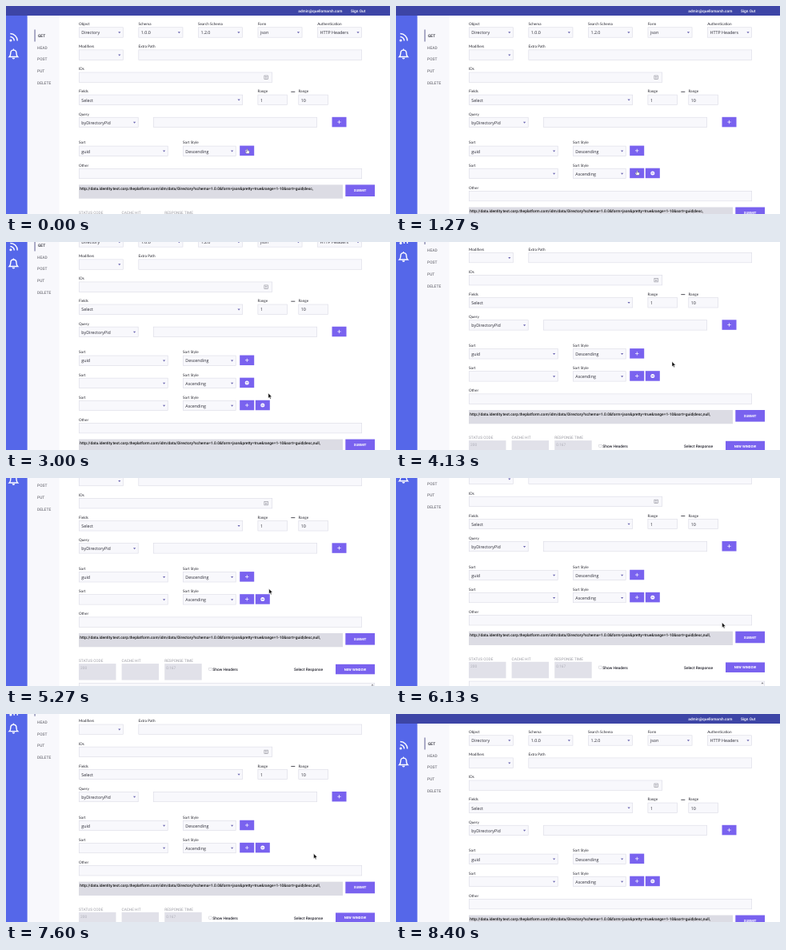
An HTML page with a canvas that plays this animation: 480x260 px, repeating every 8470 ms.

```html
<!DOCTYPE html>
<html lang="en">
<head>
<meta charset="utf-8">
<title>Query builder</title>
<style>
html, body { margin: 0; width: 480px; height: 260px; overflow: hidden; background: #fff; }
canvas { display: block; width: 480px; height: 260px; }
</style>
</head>
<body>
<canvas id="stage"></canvas>
<script>
const W = 480, H = 260, LOOP = 8470;
const LEFT = 91, COL = 74.55, ROW = 28.1, BOX = 13, WIDE = 445;
const canvas = document.getElementById('stage');
const ctx = canvas.getContext('2d');
const dpr = window.devicePixelRatio || 1;
canvas.width = W * dpr;
canvas.height = H * dpr;
ctx.textRendering = 'geometricPrecision';

const FORM = '"Open Sans", "Noto Sans", sans-serif';
const LABEL = 'Lato, "Open Sans", sans-serif';
const UI = 'Roboto, "Liberation Sans", sans-serif';
const PURPLE = '#7962ef', INK = '#262630', GREY = '#77777f', EDGE = '#dcdce6';
const URL_TEXT = 'http://data.identity.test.corp.theplatform.com/idm/data/Directory' +
  '?schema=1.0.0&form=json&pretty=true&range=1-10&sort=guid|desc,';

const ADD_SECOND = 470, ADD_THIRD = 1470, DROP_THIRD = 3400;

// Pointer moves: start, end, tip x, tip y
const MOVES = [
  [900, 1270, 301.5, 205.5],
  [1500, 2200, 330.5, 187.5],
  [2900, 3200, 320.5, 193],
  [3600, 4100, 345, 149.5],
  [4150, 4550, 328.7, 138.5],
  [5870, 6270, 438, 197],
  [6500, 6600, 365, 141.5],
  [7400, 8000, 440, 268],
];

const col = i => LEFT + COL * i;
const row = i => 23 + ROW * i;
const linear = (t, a, b) => Math.min(1, Math.max(0, (t - a) / (b - a)));
const glide = (t, a, b) => {
  const u = linear(t, a, b);
  return u * u * (3 - 2 * u);
};

function scrollAt(t) {
  const down = 38 * linear(t, 2140, 3130) + 3.5 * linear(t, 3200, 4130) +
    16 * linear(t, 5040, 5270) + 2.7 * linear(t, 5270, 6270);
  return down * (1 - glide(t, 7370, 8000));
}

function pointerAt(t) {
  let x = 301.5, y = 178.5;
  for (const [a, b, tx, ty] of MOVES) {
    const u = glide(t, a, b);
    x += (tx - x) * u;
    y += (ty - y) * u;
  }
  return [x, y];
}

function text(str, x, y, size, color = INK, font = UI, weight = 400, align = 'left') {
  ctx.font = `${weight} ${size}px ${font}`;
  ctx.textAlign = align;
  ctx.fillStyle = color;
  ctx.fillText(str, x, y + size * 0.36);
}

function rect(x, y, w, h, color) {
  ctx.fillStyle = color;
  ctx.fillRect(x, y, w, h);
}

function frame(x, y, w, h, color, line = 0.6) {
  ctx.strokeStyle = color;
  ctx.lineWidth = line;
  ctx.strokeRect(x + line / 2, y + line / 2, w - line, h - line);
}

function disc(x, y, r, end = Math.PI * 2) {
  ctx.beginPath();
  ctx.arc(x, y, r, 0, end);
  ctx.fill();
}

function wedge(x, y, size) {
  ctx.beginPath();
  ctx.moveTo(x - 1.6, y - size);
  ctx.lineTo(x + 1.6, y - size);
  ctx.lineTo(x, y + size);
  ctx.fill();
}

// A box with its name above; y is the middle of the name
function field(name, x, y, right, value = '') {
  text(name, x, y, 4.65, INK, LABEL);
  rect(x, y + 4, right - x, BOX, '#f8f8fc');
  frame(x, y + 4, right - x, BOX, EDGE);
  text(value, x + 3.3, y + 10.8, 5.35, INK, FORM);
}

function select(name, x, y, right, value) {
  field(name, x, y, right, value);
  ctx.fillStyle = '#6a64b0';
  wedge(right - 4.9, y + 10.8, 1);
}

function button(x, y, w, h, name) {
  rect(x, y, w, h, PURPLE);
  const cx = x + w / 2, cy = y + h / 2;
  if (name === '+') {
    rect(cx - 2.2, cy - 0.35, 4.4, 0.7, '#fff');
    rect(cx - 0.35, cy - 2.2, 0.7, 4.4, '#fff');
  } else if (name === '-') {
    ctx.fillStyle = '#fff';
    disc(cx, cy, 2.5);
    rect(cx - 1.4, cy - 0.4, 2.8, 0.8, PURPLE);
  } else {
    text(name, cx, cy, 4.25, '#fff', UI, 700, 'center');
  }
}

function icons() {
  ctx.strokeStyle = ctx.fillStyle = '#fff';
  ctx.lineWidth = 1.4;
  for (const r of [5, 9]) {
    ctx.beginPath();
    ctx.arc(5.3, 44, r, -Math.PI / 2, 0);
    ctx.stroke();
  }
  disc(5.9, 43.4, 1.5);
  ctx.stroke(new Path2D('M4.2 64 Q5.8 62.6 5.8 59.5 C5.8 54.3 13 54.3 13 59.5 Q13 62.6 14.6 64 Z'));
  rect(8.8, 54, 1.2, 2, '#fff');
  disc(9.4, 65.2, 1.8, Math.PI);
}

function chrome() {
  rect(0, 0, W, 12.5, '#3d45a6');
  text('admin@quellomarsh.com', 420.5, 6.4, 4.8, '#fff', UI, 500, 'right');
  text('Sign Out', 431, 6.4, 4.8, '#fff', UI, 500);
  icons();
  rect(35.6, 30, 0.9, 15, '#4a4a86');
  ['GET', 'HEAD', 'POST', 'PUT', 'DELETE'].forEach((name, i) =>
    text(name, i ? 39 : 40, 37.6 + i * 14.8, 4.9, i ? GREY : INK, UI, 500));
}

function filters() {
  const top = { Object: 'Directory', Schema: '1.0.0', 'Search Schema': '1.2.0',
    Form: 'json', Authentication: 'HTTP Headers' };
  Object.entries(top).forEach(([name, value], i) =>
    select(name, col(i), row(0), col(i) + 55.7, value));

  select('Modifiers', LEFT, row(1), LEFT + 55.7);
  field('Extra Path', col(1), row(1), WIDE);

  field('IDs', LEFT, row(2), 333);
  frame(322.6, row(2) + 8, 5, 5, '#8a8a94');
  for (const dy of [9.6, 11]) rect(324, row(2) + dy, 2.2, 0.6, '#8a8a94');

  select('Fields', LEFT, row(3), 296, 'Select');
  field('Range', 314.6, row(3), 352, '1');
  rect(356.3, row(3), 5, 0.8, INK);
  field('Range', 365.5, row(3), 403, '10');

  select('Query', LEFT, row(4), 165.5, 'byDirectoryPid');
  field('', 184, row(4), 389);
  button(407.5, row(4) + 3.9, 18, 12.5, '+');
}

function sortRows(rows) {
  for (let i = 0; i < rows; i++) {
    const y = 171.3 + i * ROW;
    select('Sort', LEFT, y, 202.5, i ? '' : 'guid');
    select('Sort Style', 221, y, 287.5, i ? 'Ascending' : 'Descending');
    const marks = !i ? '+' : i === rows - 1 ? '+-' : '-';
    [...marks].forEach((mark, k) => button(292.2 + k * 19.6, y + 3.8, 18, 12.5, mark));
  }
}

function results(url) {
  field('Other', LEFT, 199.5, WIDE);
  rect(LEFT, 223.9, 330, 17.3, '#dcdce4');
  text(url, 92.3, 228.9, 4.85, '#111', UI, 500);
  button(424.3, 223.9, 36.7, 14.6, 'SUBMIT');

  const stats = { 'STATUS CODE': '200', 'CACHE HIT': '', 'RESPONSE TIME': '0.167' };
  Object.entries(stats).forEach(([name, value], i) => {
    const x = LEFT + i * 53.6;
    text(name, x, 258.5, 4.75, '#9a9aa2');
    rect(x, 262, 46.5, 20.5, '#e1e1e9');
    text(value, x + 2, 267.2, 4.8, '#b0b0ba');
  });
  frame(253.5, 267, 3.8, 3.8, '#c4c4cc', 0.5);
  text('Show Headers', 258.3, 269.2, 4.85, INK, UI, 500);
  text('Select Response', 360, 269.2, 4.85, INK, UI, 500);
  button(412, 262.7, 49, 12.5, 'NEW WINDOW');

  rect(LEFT, 286, 370, 40, '#f8f8fb');
  frame(LEFT, 286, 370, 40, EDGE);
  ctx.fillStyle = '#85858d';
  wedge(458, 288.4, -1);
}

function pointer(x, y, hand) {
  const shape = new Path2D(hand
    ? 'M-.5 0 H.4 V2.3 L2.8 2.8 V4.6 L2.2 6 H-.8 L-2.5 3.8 L-2 3.2 L-.5 4 Z'
    : 'M0 0 V6.2 L1.4 5 L2.4 7.2 L3.4 6.8 L2.5 4.6 L4.4 4.5 Z');
  ctx.save();
  ctx.translate(x, y);
  ctx.lineWidth = 0.4;
  ctx.fillStyle = hand ? '#fff' : '#111';
  ctx.strokeStyle = hand ? '#555' : '#fff';
  ctx.fill(shape);
  ctx.stroke(shape);
  ctx.restore();
}

function draw(t) {
  const rows = 1 + (t >= ADD_SECOND) + (t >= ADD_THIRD && t < DROP_THIRD);
  const [px, py] = pointerAt(t);
  const overButton = t < 1560 || Math.abs(t - 3400) < 220 || Math.abs(t - 6380) < 150;

  ctx.setTransform(dpr, 0, 0, dpr, 0, 0);
  rect(0, 0, W, H, '#fff');
  rect(0, 0, 26.8, H, '#5567e9');
  rect(26.8, 0, 39.7, H, '#f8f8fc');
  ctx.save();
  ctx.translate(0, -0.5 - scrollAt(t));
  chrome();
  filters();
  sortRows(rows);
  ctx.translate(0, (rows - 1) * ROW);
  results(URL_TEXT + (t >= ADD_THIRD ? 'null,' : ''));
  ctx.restore();
  pointer(px, py, overButton);
}

const start = performance.now();
function tick() {
  draw((performance.now() - start) % LOOP);
  requestAnimationFrame(tick);
}
tick();
</script>
</body>
</html>
```
